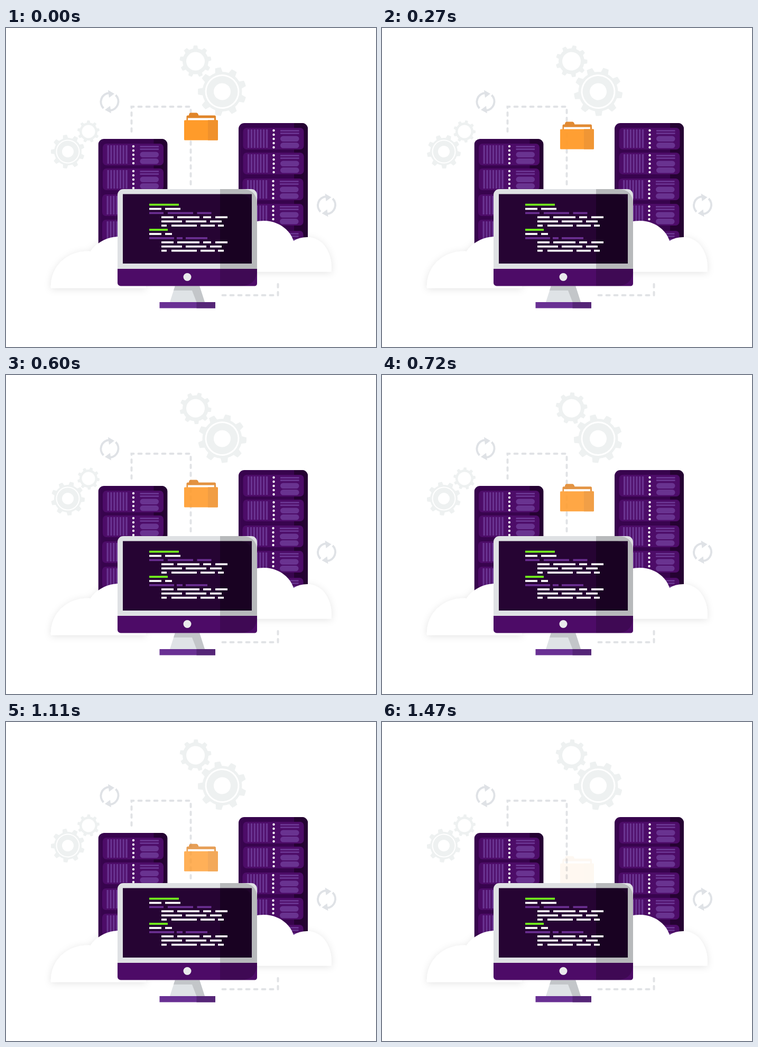
Animation, 700 px wide and 604 px high, one loop 1500 ms. Source, as an HTML page:

```html
<!DOCTYPE html>
<html lang="en">
<head>
<meta charset="utf-8">
<title>Cloud transfer</title>
<style>
html, body { margin: 0; width: 100%; height: 100%; overflow: hidden; background: #fff; }
svg { display: block; width: 100vw; height: 100vh; }
</style>
</head>
<body>
<svg id="stage" viewBox="0 0 700 604" xmlns="http://www.w3.org/2000/svg">
  <defs>
    <filter id="soft" x="-20%" y="-20%" width="140%" height="140%">
      <feDropShadow dx="0" dy="2" stdDeviation="7" flood-color="#000" flood-opacity=".11"/>
    </filter>
    <clipPath id="case"><path d="M211 316a11 11 0 0 1 11-11H464a11 11 0 0 1 11 11V484a4.500 4.500 0 0 1-4.500 4.500H217a6 6 0 0 1-6-6Z"/></clipPath>
    <clipPath id="rack"><rect width="131" height="300" rx="11"/></clipPath>
    <g id="cycle" fill="none" stroke="#dfe2e6" stroke-width="4">
      <path d="M-11.500 12.500A17 17 0 0 1-1-16.500M11.500-12.500A17 17 0 0 1 1 16.500"/>
      <path fill="#dfe2e6" stroke="none" d="M-3-22L9-15L-1-7.500ZM3 22L-9 15.500L1 8Z"/>
    </g>
  </defs>

  <g id="gears" fill="#eef1f1" fill-rule="evenodd"></g>
  <use href="#cycle" x="196" y="139.500"/>
  <use href="#cycle" x="606.500" y="335.500"/>
  <g fill="none" stroke="#e1e3e6" stroke-width="4" stroke-linecap="round" stroke-dasharray="6 9">
    <path d="M237.500 196V149H349.500V305"/>
    <path d="M409.500 506H514.500V479"/>
  </g>

  <g id="folder">
    <path fill="#e08529" d="M341.500 178V168Q341.500 165.500 344 165.500H346Q346 160.500 350 160.500H360Q363 160.500 364.500 165.500H394.500Q397 165.500 397 168V178Z"/>
    <rect x="344" y="170.500" width="50" height="6" fill="#fff"/>
    <rect x="337" y="174.500" width="64" height="38" rx="1.500" fill="#ff9b2a"/>
    <path fill="#f0912c" d="M382 174.500H399.500Q401 174.500 401 176V211Q401 212.500 399.500 212.500H382Z"/>
  </g>

  <g id="racks"></g>

  <g fill="#fff" filter="url(#soft)">
    <path d="M85 492.500C83 453 115 420 160 423C172 405 193 395 215 395H265V492.500Z"/>
    <path d="M430 461.500V400C440 378 462 365 488 365C514 365 537 381 544 403Q555 396 570 396C598 396 619 425 615.500 461.500Z"/>
  </g>

  <path fill="#dfe3e6" d="M320 488H366L376 519H310Z"/>
  <path fill="#c3c6c9" d="M320 488H366L376 519H360.500L352 497H317Z"/>
  <rect x="290.500" y="519" width="105.500" height="11.500" fill="#693093"/>
  <rect x="360.500" y="519" width="35.500" height="11.500" fill="#552577"/>

  <g clip-path="url(#case)">
    <rect x="211" y="305" width="264" height="184" fill="#dfe1e4"/>
    <rect x="211" y="456" width="264" height="33" fill="#4d0b67"/>
    <rect x="221" y="314.500" width="244" height="131.500" fill="#260433"/>
    <path fill="#000" opacity=".18" d="M405 305H446Q475 305 475 334V456Q475 488.500 444 488.500H405Z"/>
    <path fill="#000" opacity=".2" d="M405 314.500H446Q465 318 465 338V446H405Z"/>
  </g>
  <circle cx="343" cy="471.500" r="7.500" fill="#eaeaec"/>
  <g id="code"></g>
</svg>
<script>
const LOOP = 1500, STEP = 30, TEETH = 9;
const $ = id => document.getElementById(id);

// x, y, outer radius, body radius, hole radius, groove radii, start angle, direction
const gears = [
  { x: 409, y: 120.5, tip: 46, body: 37.5, rings: [32.5, 29.5, 16], start: -10, dir: 1 },
  { x: 358.5, y: 63, tip: 30, body: 24.5, rings: [17.5], start: 0, dir: -1 },
  { x: 117, y: 234, tip: 32, body: 26, rings: [22.5, 20.5, 11], start: -10, dir: 1 },
  { x: 156, y: 196, tip: 21, body: 17, rings: [12.5], start: 0, dir: -1 }
];

function gearPath({ tip, body, rings }) {
  const pitch = 2 * Math.PI / TEETH;
  const pt = (r, a) => (r * Math.sin(a)).toFixed(2) + ' ' + (-r * Math.cos(a)).toFixed(2);
  let d = '';
  for (let i = 0; i < TEETH; i++) {
    const a = i * pitch, foot = pitch * .27, top = pitch * .17;
    d += `${i ? `A${body} ${body} 0 0 1 ` : 'M'}${pt(body, a - foot)}` +
      `L${pt(tip, a - top)}A${tip} ${tip} 0 0 1 ${pt(tip, a + top)}L${pt(body, a + foot)}`;
  }
  d += `A${body} ${body} 0 0 1 ${pt(body, -pitch * .27)}Z`;
  for (const r of rings) d += `M0 ${-r}A${r} ${r} 0 1 0 0 ${r}A${r} ${r} 0 1 0 0 ${-r}Z`;
  return d;
}

$('gears').innerHTML = gears.map(g => `<path d="${gearPath(g)}"/>`).join('');
const gearNodes = [...$('gears').children];

const box = (x, y, w, h, fill, r = 0) =>
  `<rect x="${x}" y="${y}" width="${w}" height="${h}" rx="${r}" fill="${fill}"/>`;

function unit(x, y) {
  const lilac = '#693390';
  let s = box(0, 0, 115, 41, '#4d0c68', 7);
  for (let i = 0; i < 7; i++) s += box(8.5 + i * 5.8, 3, 3.4, 35, lilac);
  for (let i = 0; i < 5; i++) s += `<circle cx="58" cy="${5 + i * 8}" r="2.200" fill="#fff"/>`;
  for (const ly of [4, 9]) s += box(70.5, ly, 35.5, 3, lilac);
  for (const py of [15.5, 28]) s += box(70.5, py, 35.5, 10.5, lilac, 5.2);
  return `<g transform="translate(${x} ${y})">${s}</g>`;
}

function rack(x, y) {
  const rows = [9, 56, 105, 153, 204].map((ry, i) => unit(i > 1 ? 7.5 : 8.5, ry)).join('');
  return `<g transform="translate(${x} ${y})"><g clip-path="url(#rack)">` +
    box(0, 0, 131, 230, '#38044e') + box(105, 0, 26, 230, '#250232') + rows + '</g></g>';
}

$('racks').innerHTML = rack(174.5, 210) + rack(440, 180);

const white = '#fff', green = '#73f51c', purple = '#6b2f92';
const block = [
  [294, 23, 324, 42, 373, 15, 396, 23],
  [294, 39, 340, 39, 386, 22],
  [294, 10, 313, 48, 368, 27, 401, 11]
];
const lines = [
  [green, [271, 56]],
  [white, [271, 23, 301, 29]],
  [purple, [271, 27, 306, 48, 361.5, 27]],
  ...block.map(b => [white, b]),
  [green, [271, 35]],
  [white, [271, 23, 301, 13]],
  [purple, [271, 47, 323, 11, 340, 41]],
  ...block.map(b => [white, b])
];
$('code').innerHTML = lines.map(([fill, run], i) => {
  let s = '';
  for (let k = 0; k < run.length; k += 2) s += box(run[k], 332.7 + i * 7.92, run[k + 1], 3.7, fill);
  return s;
}).join('');

const fade = t => t < 1100 ? 1 - .2 * t / 1100 : .8 * (LOOP - t) / 400;

function draw(now) {
  const t = Math.floor(now % LOOP / STEP) * STEP;
  const turn = t / LOOP * 4 * 360 / TEETH;
  gears.forEach((g, i) => gearNodes[i].setAttribute('transform',
    `translate(${g.x} ${g.y}) rotate(${(g.start + g.dir * turn).toFixed(3)})`));
  $('folder').setAttribute('transform', `translate(0 ${(t * .0634).toFixed(3)})`);
  $('folder').setAttribute('opacity', fade(t).toFixed(3));
}

let begin;
function tick(now) {
  begin ??= now;
  draw(now - begin);
  requestAnimationFrame(tick);
}
draw(0);
requestAnimationFrame(tick);
</script>
</body>
</html>
```
